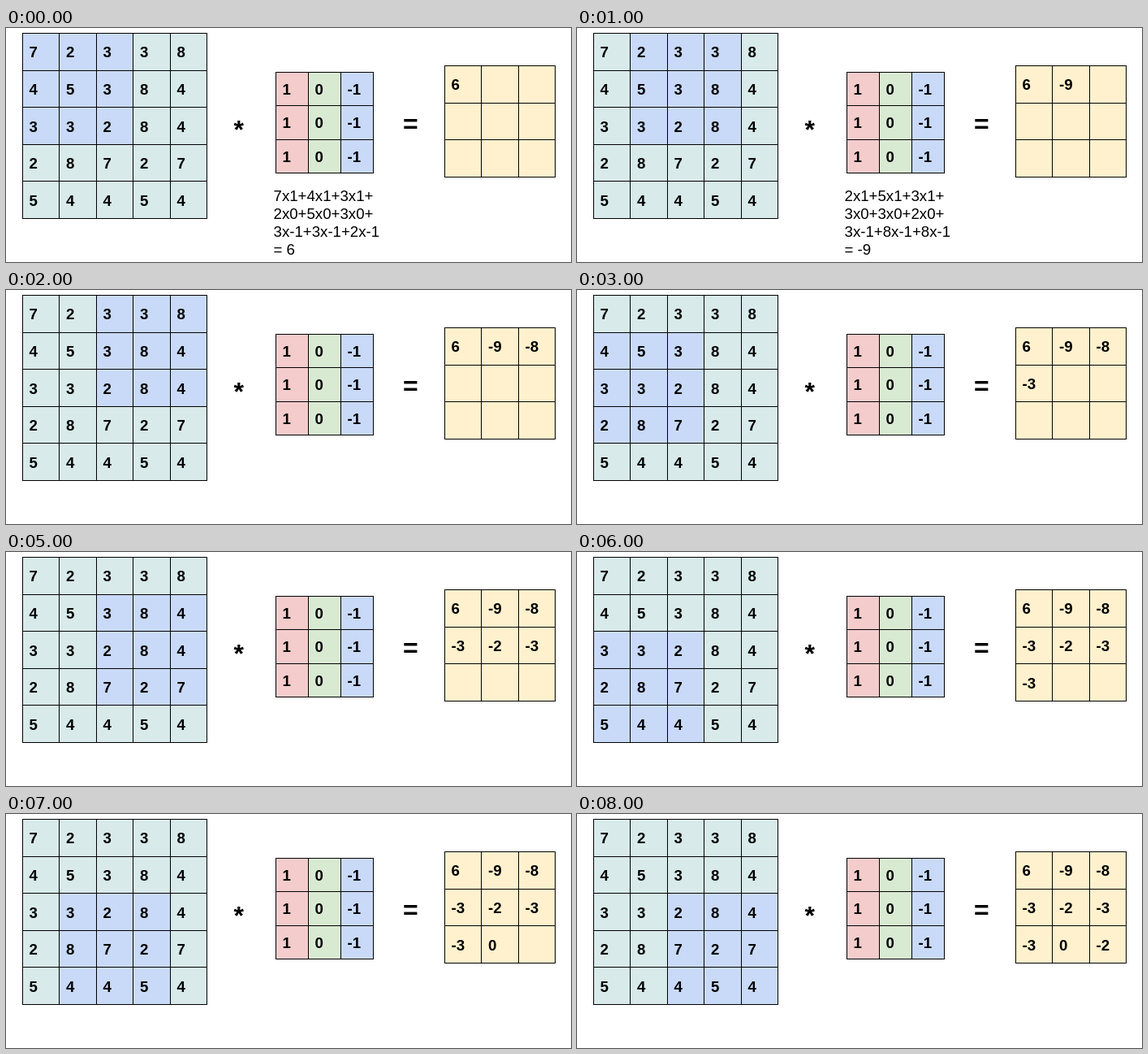
An HTML page with a canvas for the animation above (9000 ms loop, 696 by 288 pixels).

```html
<!DOCTYPE html>
<html lang="en">
<head>
<meta charset="utf-8">
<title>Convolution step by step</title>
<style>
html, body { margin: 0; width: 100%; height: 100%; overflow: hidden; background: #fff; }
canvas { display: block; }
</style>
</head>
<body>
<canvas id="stage" width="696" height="288"></canvas>
<script>
const ctx = document.getElementById('stage').getContext('2d');
const FAMILY = '"Liberation Sans", Arial, sans-serif';
const TEAL = '#d8eaea', BLUE = '#c9daf8', RED = '#f4cccc', GREEN = '#d9ead3', CREAM = '#fff1cd';
const STEP = 1000, STEPS = 9;

const input = [
  [7, 2, 3, 3, 8],
  [4, 5, 3, 8, 4],
  [3, 3, 2, 8, 4],
  [2, 8, 7, 2, 7],
  [5, 4, 4, 5, 4]
];
const kernel = [[1, 0, -1], [1, 0, -1], [1, 0, -1]];

// Products for one window position, column by column
function products(step) {
  const top = Math.floor(step / 3), left = step % 3;
  return [0, 1, 2].map(c => [0, 1, 2].map(r => [input[top + r][left + c], kernel[r][c]]));
}

function result(step) {
  return products(step).flat().reduce((sum, [a, b]) => sum + a * b, 0);
}

function grid(x, y, n, w, h, color, value) {
  const px = i => Math.floor(x + i * w), py = i => Math.floor(y + i * h);
  ctx.font = 'bold 18.67px ' + FAMILY;
  for (let r = 0; r < n; r++) {
    for (let c = 0; c < n; c++) {
      ctx.fillStyle = color(r, c);
      ctx.fillRect(px(c), py(r), px(c + 1) - px(c), py(r + 1) - py(r));
      ctx.fillStyle = '#000';
      ctx.fillText(value(r, c), x + c * w + 8.5, Math.round(y + r * h + h / 2 + 7));
    }
  }
  for (let i = 0; i <= n; i++) {
    ctx.fillRect(px(i), py(0), 1, py(n) - py(0) + 1);
    ctx.fillRect(px(0), py(i), px(n) - px(0) + 1, 1);
  }
}

// Places a glyph so that its ink is centred on a point
function sign(text, x, y) {
  ctx.font = 'bold 32px ' + FAMILY;
  const m = ctx.measureText(text);
  ctx.fillText(text,
    x + (m.actualBoundingBoxLeft - m.actualBoundingBoxRight) / 2,
    y + (m.actualBoundingBoxAscent - m.actualBoundingBoxDescent) / 2);
}

function formula(step) {
  const lines = products(step).map(col => col.map(p => p.join('x')).join('+'));
  lines[0] += '+';
  lines[1] += '+';
  lines.push('= ' + result(step));
  ctx.font = '18.67px ' + FAMILY;
  lines.forEach((line, i) => ctx.fillText(line, 329.5, 213 + i * 22));
}

function draw(step) {
  const top = Math.floor(step / 3), left = step % 3;
  const inside = (r, c) => r >= top && r < top + 3 && c >= left && c < left + 3;
  ctx.fillStyle = '#fff';
  ctx.fillRect(0, 0, 696, 288);
  grid(20, 6.5, 5, 45.5, 45.6, (r, c) => inside(r, c) ? BLUE : TEAL, (r, c) => input[r][c]);
  grid(332, 54, 3, 40, 41.5, (r, c) => [RED, GREEN, BLUE][c], (r, c) => kernel[r][c]);
  grid(540, 46.5, 3, 45.5, 45.7, () => CREAM, (r, c) => r * 3 + c <= step ? result(r * 3 + c) : '');
  sign('*', 287, 120);
  sign('=', 498.5, 117.5);
  if (step < 2) formula(step);
}

let start, shown = -1;
function tick(now) {
  if (start === undefined) start = now;
  const step = Math.floor(Math.max(0, now - start) / STEP) % STEPS;
  if (step !== shown) draw(shown = step);
  requestAnimationFrame(tick);
}
draw(0);
requestAnimationFrame(tick);
</script>
</body>
</html>
```
